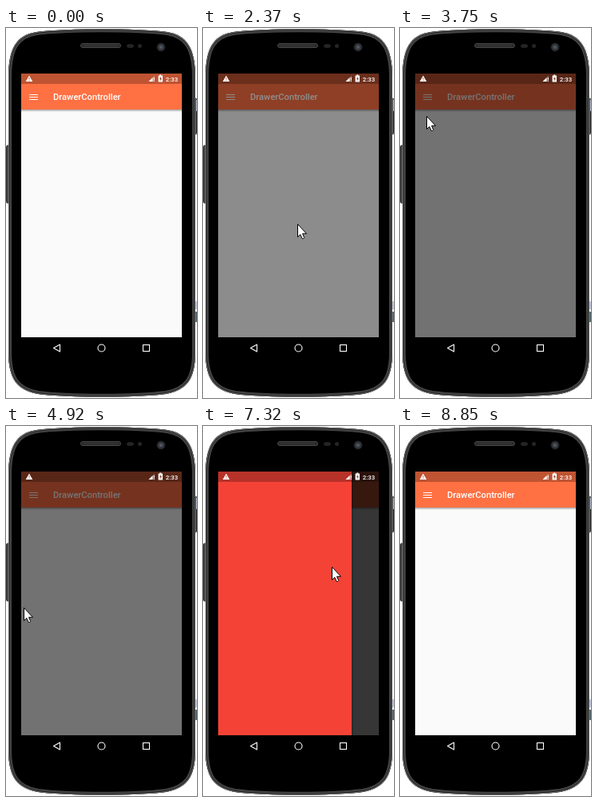
Recreate the animation shown at these times as an HTML page. Size 239 px wide and 463 px high, loop 9480 ms.

```html
<!DOCTYPE html>
<html lang="en">
<head>
<meta charset="utf-8">
<title>Nested drawers</title>
<style>
  html, body { margin: 0; width: 100%; height: 100%; overflow: hidden; background: #fff; }
  svg { display: block; width: 239px; height: 463px; }
  text { font-family: Roboto, sans-serif; font-weight: 500; fill: #fff; }
</style>
</head>
<body>
<svg viewBox="0 0 239 463">
  <defs>
    <path id="body" d="M3 62C3 25 13 9 38 5C80 0 160 0 202 5C226 9 237 25 237 62V405C237 440 226 453 200 458C160 463 80 463 40 458C14 453 3 440 3 405Z"/>
    <clipPath id="inside"><use href="#body"/></clipPath>
    <clipPath id="screen"><rect x="19" y="57" width="201" height="330"/></clipPath>
    <clipPath id="bar"><rect x="19" y="70" width="201" height="32"/></clipPath>
    <linearGradient id="drop" x2="0" y2="1">
      <stop offset="0" stop-opacity=".35"/>
      <stop offset="1" stop-opacity="0"/>
    </linearGradient>
    <linearGradient id="side">
      <stop offset="0" stop-opacity=".3"/>
      <stop offset="1" stop-opacity="0"/>
    </linearGradient>
  </defs>

  <!-- phone body -->
  <rect x=".5" y="147" width="6" height="72" rx="1.5" fill="#4a4a4a" stroke="#2c2c2c"/>
  <rect x="233" y="88" width="5.500" height="45" rx="1.5" fill="#4a4a4a" stroke="#2c2c2c"/>
  <path d="M238 90h1v14h-1zM237 342h2v10h-2z" fill="#b9c3d8"/>
  <path d="M237 355h2v13h-2z" fill="#52656c"/>
  <g clip-path="url(#inside)">
    <use href="#body" stroke="#444" stroke-width="8"/>
    <use href="#body" fill="none" stroke="#262626" stroke-width="4"/>
    <use href="#body" fill="none" stroke="#6a6a6a" stroke-width="2"/>
  </g>
  <rect x="93.500" y="19.500" width="50" height="5" rx="2.500" fill="#282828" stroke="#484848"/>
  <path d="M97 22h43" stroke="#3c3c3c"/>
  <ellipse cx="155.500" cy="22.500" rx="4.500" ry="2.500" fill="#242424"/>
  <circle cx="167.500" cy="22.500" r="2.500" fill="#242424"/>
  <circle cx="194" cy="24" r="5" fill="#30343a" stroke="#202020"/>
  <circle cx="194" cy="24" r="2.300" fill="#4e555e"/>
  <g fill="none" stroke="#fff" stroke-width="1.100">
    <path d="M67.500 396V405L59.500 400.500Z" stroke-linejoin="round"/>
    <circle cx="119.500" cy="400.500" r="4.500"/>
    <rect x="171.500" y="396.500" width="8" height="8"/>
  </g>

  <g clip-path="url(#screen)">
    <rect x="19" y="57" width="201" height="330" fill="#fafafa"/>
    <rect x="19" y="102" width="201" height="3" fill="url(#drop)"/>
    <rect x="19" y="57" width="201" height="45" fill="#ff7043"/>
    <path d="M29 83.500h11m-11 3h11m-11 3h11" stroke="#fff" stroke-width="1.100"/>
    <text x="59" y="90.400" font-size="11.160">DrawerController</text>
    <circle id="ripple" cx="34" cy="86" r="18.500" fill="#fff" clip-path="url(#bar)"/>
    <rect id="outerScrim" x="19" y="57" width="201" height="330"/>
    <rect id="innerScrim" x="19" y="57" width="201" height="330"/>
    <g id="drawer">
      <rect x="190" y="57" width="3" height="330" fill="url(#side)"/>
      <rect x="19" y="57" width="171" height="330" fill="#f44336"/>
    </g>
    <rect x="19" y="57" width="201" height="13" opacity=".25"/>
    <!-- status icons -->
    <g transform="translate(0 -.4)">
      <path d="M29 60L33.300 67.500H24.700Z" fill="#fff"/>
      <path d="M29 62.300v2.500m0 .7v1" stroke="#bf5432" stroke-width=".9"/>
      <path d="M186 60V67.500H178.500Z" fill="#fff" opacity=".35"/>
      <path d="M183.500 62.500V67.500H178.500Z" fill="#fff"/>
      <path d="M185.400 62.500v3m0 1v1" stroke="#fff"/>
      <path d="M192.300 59h2v1h1.700v8h-5.400v-8h1.700z" fill="#fff"/>
      <path d="M193.700 61l-1.600 3.300h1.200v2.500l1.600-3.300h-1.200z" fill="#804030"/>
      <text x="199.700" y="67" font-size="7.900">2:33</text>
    </g>
  </g>

  <path id="cursor" d="M.5.500V16.500L3.800 13.400 6.200 18.500H7.700L8.700 17.500 6.600 12.300H11.500Z" fill="#fff" stroke="#000"/>
</svg>
<script>
  const LOOP = 9480, STEP = 30, SCRIM = 0.54, DRAWER_WIDTH = 171;
  const FADE = 240, HEAD_START = 90;
  const MENU = { x: 34, y: 88 }, CENTER = { x: 118, y: 245 };
  const el = id => document.getElementById(id);
  const [ripple, outerScrim, innerScrim, drawer, cursor] =
    ['ripple', 'outerScrim', 'innerScrim', 'drawer', 'cursor'].map(el);

  const clamp = p => Math.min(1, Math.max(0, p));
  const smooth = p => p * p * (3 - 2 * p);
  const ease = (t, start, length) => smooth(clamp((t - start) / length));

  // A scrim fade is already under way when it first shows.
  const fade = (t, start) => t < start ? 0 : ease(t, start - HEAD_START, FADE + HEAD_START);
  const splash = (t, start) => t < start ? 0 : 0.22 * (1 - ease(t, start, FADE));

  const visits = [
    { from: 150, to: 5850, x: 219, y: 57, glides: [
      { at: 150, length: 660, ...MENU },
      { at: 1020, length: FADE, ...CENTER },
      { at: 2700, length: 240, ...MENU },
      { at: 3510, length: 960, x: 26, y: 228 },
      { at: 4860, length: 60, x: 22, y: 227 },
      { at: 5340, length: 510, x: 239, y: 205 }
    ] },
    { from: 7020, to: 8850, x: 219, y: 186, glides: [
      { at: 7020, length: 150, x: 168, y: 172 },
      { at: 7290, length: 150, x: 100, y: 206 },
      { at: 7440, length: 240, x: 177, y: 221 },
      { at: 7860, length: 150, x: 170, y: 222 },
      { at: 8430, length: 420, x: 239, y: 210 }
    ] }
  ];

  function drawCursor(t) {
    const visit = visits.find(v => t >= v.from && t < v.to);
    cursor.setAttribute('visibility', visit ? 'visible' : 'hidden');
    if (!visit) return;
    let { x, y } = visit;
    for (const g of visit.glides) {
      const p = ease(t, g.at, g.length);
      x += (g.x - x) * p;
      y += (g.y - y) * p;
    }
    cursor.setAttribute('transform', `translate(${Math.round(x)} ${Math.round(y)})`);
  }

  function draw() {
    const t = Math.floor(performance.now() % LOOP / STEP) * STEP;
    const dim = fade(t, 1020) - fade(t, 2370) + fade(t, 2970) - fade(t, 8430);
    const opened = ease(t, 5340, 420) - ease(t, 7290, 330);
    ripple.setAttribute('opacity', splash(t, 1020) + splash(t, 2970));
    outerScrim.setAttribute('opacity', SCRIM * dim);
    innerScrim.setAttribute('opacity', SCRIM * opened);
    drawer.setAttribute('transform', `translate(${(opened - 1) * DRAWER_WIDTH} 0)`);
    drawer.setAttribute('visibility', opened > 0 ? 'visible' : 'hidden');
    drawCursor(t);
    requestAnimationFrame(draw);
  }
  draw();
</script>
</body>
</html>
```
